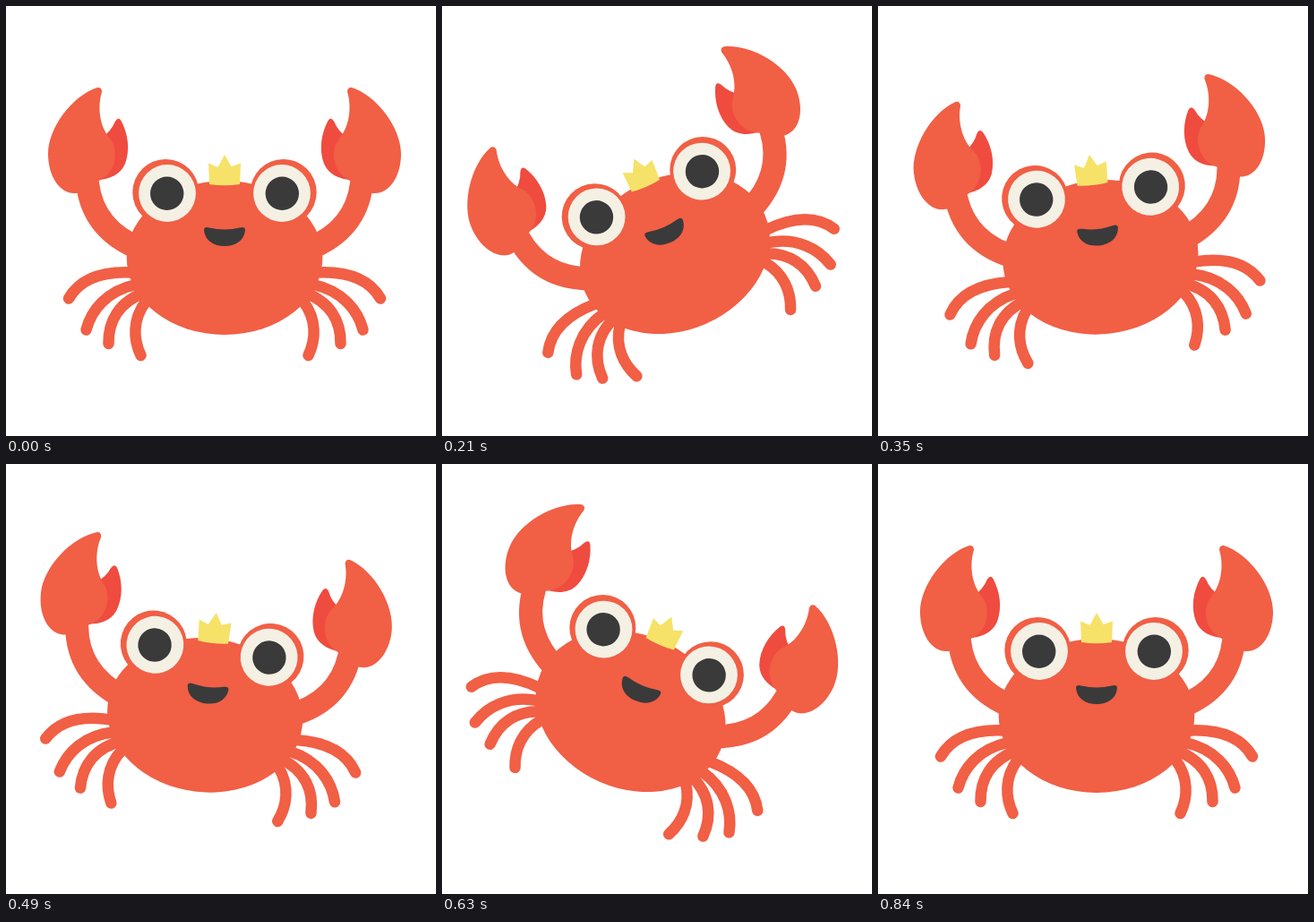
An HTML page that plays this animation: 480 by 480 pixels, repeating every 0.91 s.

```html
<!DOCTYPE html>
<html lang="en">
<head>
<meta charset="utf-8">
<title>Dancing crab</title>
<style>
  html, body { margin: 0; width: 100%; height: 100%; overflow: hidden; background: #fff; }
  svg { display: block; width: 100%; height: 100%; }
  .shell { fill: #f15f45; }
  .limb { fill: none; stroke: #f15f45; stroke-linecap: round; }
</style>
</head>
<body>
<svg viewBox="0 0 480 480">
  <defs>
    <g id="side">
      <path class="limb" stroke-width="26" d="M91 198Q97 250 150 271"/>
      <path class="limb" stroke-width="12.500" d="M70 326.500C82 306 105 296 140 297.500M89.500 361.500C95 340 112 318 145 311M114.500 377C114 352 126 330 155 320M150.500 390C142 372 141 350 156 330"/>
      <path fill="#f04b3f" d="M106 148Q118 139 121.500 129.500Q125 123 128.500 128C136 142 139 160 133 176C128 188 116 193 104 194Z"/>
      <path class="shell" d="M102 91C74 100 47 136 47 165C47 190 60 209 76 209C90 209 95 199 106 194C124 184 126 160 116 148C104 134 102 112 107 96Q107 90.500 102 91Z"/>
      <circle class="shell" cx="178.300" cy="208" r="37"/>
    </g>
    <g id="eye">
      <circle cx="180" cy="209" r="31.900" fill="#f5f0e4"/>
      <circle cx="179.700" cy="209.300" r="18.700" fill="#3a3a3a"/>
    </g>
  </defs>
  <g id="crab">
    <use href="#side"/>
    <use href="#side" transform="matrix(-1 0 0 1 488 0)"/>
    <ellipse class="shell" cx="244" cy="281" rx="109.300" ry="86"/>
    <use href="#eye"/>
    <use href="#eye" transform="matrix(-1 0 0 1 488 0)"/>
    <path fill="#f6e268" d="M226 175.500L236.500 180L244 166L251.500 179L262 175.500L261 199Q244 201.500 227 199Z"/>
    <path fill="#3a3a3a" d="M221 250Q221 246 227 247.500Q244 251.500 261 247.500Q267 246 267 250C266 262 256 268 244 268C232 268 222 262 221 250Z"/>
  </g>
</svg>
<script>
  const STEP = 70, STEPS = 13, MAX_TILT = 23.4;
  const crab = document.getElementById('crab');

  // Tilt left and back for six steps, then right and back for six.
  function pose(step) {
    const swing = 1 - Math.abs(step % 6 - 3) / 3;
    const tilt = MAX_TILT * swing ** 1.2;
    return step > 6 && step < 12
      ? `translate(-17.4) rotate(${tilt} 248 240)`
      : `rotate(${-tilt} 240 240)`;
  }

  let start;
  function draw(now) {
    start ??= now;
    const step = Math.floor((now - start) / STEP) % STEPS;
    crab.setAttribute('transform', pose(step));
    requestAnimationFrame(draw);
  }
  requestAnimationFrame(draw);
</script>
</body>
</html>
```
